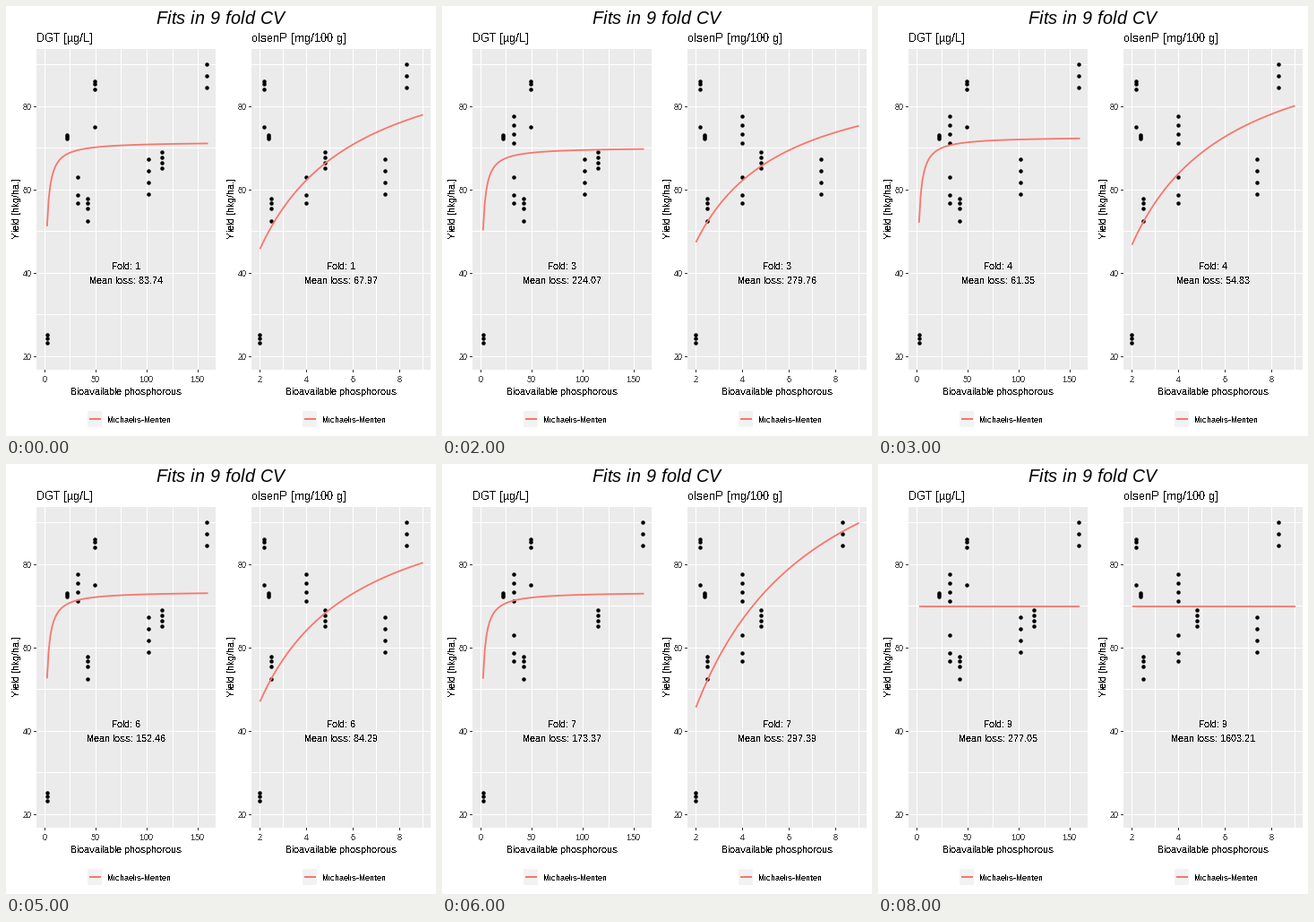
Write a matplotlib script that moves like this. It is 480x480 px and loops after 9000 ms.

```python
import numpy as np
import matplotlib.pyplot as plt
from matplotlib.animation import FuncAnimation
from matplotlib.patches import Rectangle

SIZE, DPI = 480, 96
PX = 72 / DPI
RED, GREY = "#F8766D", "#4D4D4D"
plt.rcParams.update({
    "font.family": ["Liberation Sans", "DejaVu Sans"],
    "text.hinting": "native",
    "text.hinting_factor": 1,
})

fig = plt.figure(figsize=(SIZE / DPI, SIZE / DPI), dpi=DPI, facecolor="white")
ax = fig.add_axes([0, 0, 1, 1])
ax.set(xlim=(0, SIZE), ylim=(SIZE, 0))
ax.axis("off")


def site(dgt, olsen, low, high, n=4, bend=1):
    """Rows of (DGT, olsenP, yield), yields spread from low to high."""
    yields = low + (high - low) * np.linspace(0, 1, n) ** bend
    return np.column_stack([np.full(n, dgt), np.full(n, olsen), yields])


# Each fold leaves out one site, in this order
SITES = [
    site(32.5, 4.0, 71.0, 77.6),
    site(22.0, 2.4, 72.1, 73.1, 3),
    site(158.5, 8.3, 84.5, 90.1, 3),
    site(114.5, 4.8, 65.0, 69.0),
    site(49.0, 2.2, 74.9, 86.0, bend=0.18),
    site(32.5, 4.0, 56.6, 63.0, 3, bend=1.7),
    site(101.5, 7.4, 58.8, 67.1),
    site(42.0, 2.5, 52.3, 57.7, bend=0.54),
    site(3.2, 2.0, 23.1, 25.1, 3),
]
DGT_LOSS = "83.74 42.18 224.07 61.35 198.14 152.46 173.37 216.9 277.05".split()
OLSEN_LOSS = "67.97 118.52 279.76 54.83 927.85 84.29 297.39 65.65 1603.21".split()


def menten(x, top, half):
    return top * x / (half + x)


def fit_plateau(x, y):
    """Mean of the responsive yields; steep start only if the poor site is in."""
    poor = y < 30
    half = 0.95 * poor.any()
    return y[~poor].mean() * (1 + half / 27), half


def fit_squares(x, y):
    """Least squares over a grid of half-saturation doses."""
    weight = np.where(y < 30, 3.1, 1)
    best = None
    for half in np.arange(0, 6, 0.02):
        g = menten(x, 1, half)
        top = (weight * g * y).sum() / (weight * g * g).sum()
        error = (weight * (y - top * g) ** 2).sum()
        if best is None or error < best[0]:
            best = error, top, half
    return best[1:]


def write(x, y, s, size, color="black", **kw):
    kw = {"ha": "center", "va": "baseline", "antialiased": size > 17, **kw}
    return ax.text(x, y, s, fontsize=size * PX, color=color, **kw)


def box(x, y, w, h, color):
    ax.add_patch(Rectangle((x, y), w, h, fc=color, lw=0, aa=False))


def y_px(y):
    return 112 + (80 - np.asarray(y)) * 4.65


class Panel:
    def __init__(self, left, title, key, fit, losses, origin, scale, ticks, minor, span):
        self.key, self.fit, self.losses = key, fit, losses
        self.x_px = lambda x: origin + scale * np.asarray(x)
        self.xs = np.linspace(*span, 100)
        mid = left + 100
        box(left, 48, 200, 358, "#EBEBEB")

        for v in range(20, 91, 10):
            y = int(y_px(v))
            box(left, y, 200, 1, "white")
            if v % 20 == 0:
                box(left - 3, y, 3, 1, "#333333")
                write(left - 5, y + 4, v, 9, GREY, ha="right")
        for v in [*ticks, *minor]:
            x = int(round(self.x_px(v)))
            box(x, 48, 1, 358, "white")
            if v in ticks:
                box(x, 406, 1, 3, "#333333")
                write(x, 420, v, 9, GREY)

        write(left, 40, title, 13, ha="left")
        write(mid, 434, "Bioavailable phosphorous", 11)
        write(left - 17, 226, "Yield [hkg/ha.]", 11, rotation=90, ha="right",
              va="center")
        box(left + 57, 452, 16, 18, "#F2F2F2")
        box(left + 59, 460, 13, 2, RED)
        write(left + 79, 465, "Michaelis-Menten", 9, ha="left")

        self.dots = ax.plot([], [], "o", color="black", ms=4.5 * PX, mew=0)[0]
        self.curve = ax.plot([], [], color=RED, lw=1.8 * PX, solid_capstyle="butt")[0]
        self.fold = write(mid, 294, "", 11)
        self.loss = write(mid, 310, "", 11)

    def show(self, k):
        rows = np.vstack(SITES[:k] + SITES[k + 1:])
        x, y = rows[:, self.key], rows[:, 2]
        self.dots.set_data(self.x_px(x), y_px(y) - 0.5)
        heights = menten(self.xs, *self.fit(x, y))
        self.curve.set_data(self.x_px(self.xs) + 0.5, y_px(heights) + 0.5)
        self.fold.set_text(f"Fold: {k + 1}")
        self.loss.set_text(f"Mean loss: {self.losses[k]}")
        return self.dots, self.curve, self.fold, self.loss


write(239.5, 20, "Fits in 9 fold CV", 20, style="italic")
panels = [
    Panel(34, "DGT [µg/L]", 0, fit_plateau, DGT_LOSS, 42.6, 1.144,
          range(0, 151, 50), range(25, 126, 50), (2.4, 159.4)),
    Panel(274, "olsenP [mg/100 g]", 1, fit_squares, OLSEN_LOSS, 231, 26,
          range(2, 9, 2), range(3, 10, 2), (2, 9)),
]


def update(k):
    return [artist for p in panels for artist in p.show(k)]


anim = FuncAnimation(fig, update, frames=9, interval=1000, repeat=True,
                     repeat_delay=0, blit=False)
plt.show()
```
